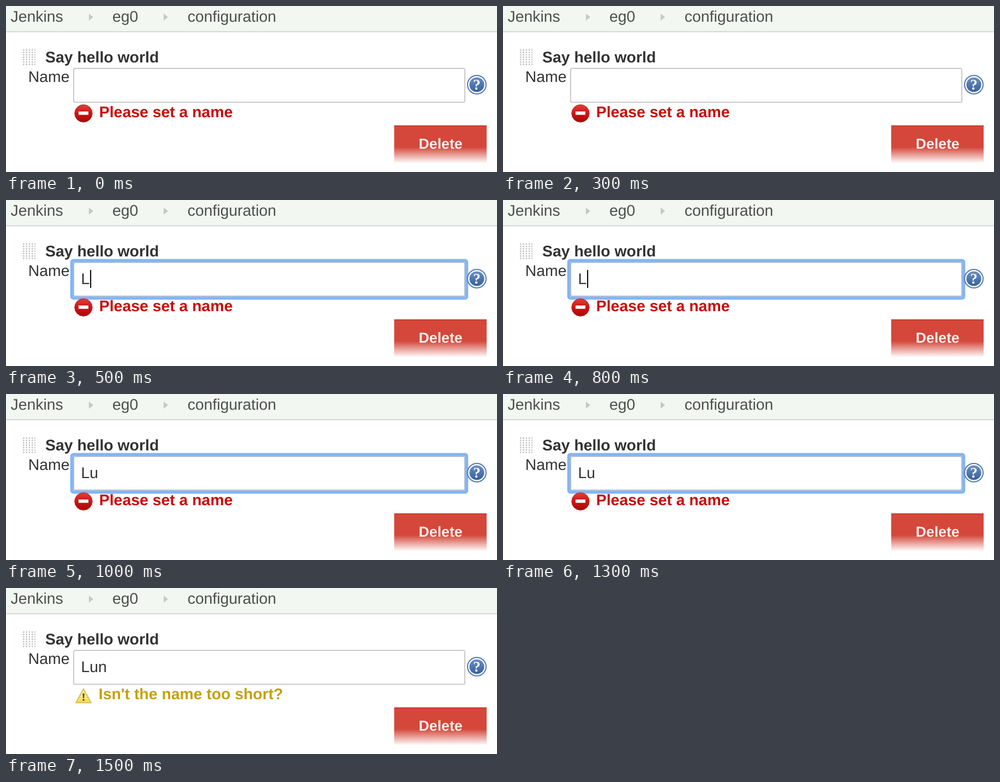
These frames come from a looping animation (900 by 306 pixels, 2000 ms). An HTML page:

```html
<!DOCTYPE html>
<html lang="en">
<head>
<meta charset="utf-8">
<title>Name field check</title>
<style>
  html, body { margin: 0; width: 100%; height: 100%; overflow: hidden; background: #fff; }
  svg { display: block; width: 900px; height: 306px; }
  text { font: 28.4px "Liberation Sans", Arial, sans-serif; fill: #333; white-space: pre; text-rendering: geometricPrecision; }
  .crumb { fill: #4d4f4d; }
  .bold { font-weight: bold; }
  .focus, .caret, .error, .warning, .typed tspan { animation: 2s step-end infinite; }
  .focus { animation-name: middle; }
  .caret { animation-name: second; }
  .error { animation-name: first-three; }
  .warning { animation-name: last; }
  .typed tspan:nth-child(1) { animation-name: from-second; }
  .typed tspan:nth-child(2) { animation-name: from-third; }
  .typed tspan:nth-child(3) { animation-name: last-letter; }
  @keyframes middle { 0%, 75% { visibility: hidden } 25% { visibility: visible } }
  @keyframes second { 0%, 50% { visibility: hidden } 25% { visibility: visible } }
  @keyframes first-three { 0% { visibility: visible } 75%, 100% { visibility: hidden } }
  @keyframes last { 0% { visibility: hidden } 75%, 100% { visibility: visible } }
  @keyframes from-second { 0% { fill-opacity: 0 } 25%, 100% { fill-opacity: 1 } }
  @keyframes from-third { 0% { fill-opacity: 0 } 50%, 100% { fill-opacity: 1 } }
  @keyframes last-letter { 0% { fill-opacity: 0 } 75%, 100% { fill-opacity: 1 } }
</style>
</head>
<body>
<svg viewBox="0 0 900 306">
  <defs>
    <pattern id="dots" x="31" y="80" width="5.3" height="4.4" patternUnits="userSpaceOnUse">
      <rect width="2.6" height="2.4" fill="#bdbfbd"/>
    </pattern>
    <linearGradient id="red" x2="0" y2="1">
      <stop offset="0" stop-color="#e0403a"/>
      <stop offset=".5" stop-color="#cf1412"/>
      <stop offset="1" stop-color="#a80808"/>
    </linearGradient>
    <linearGradient id="blue" x2="0" y2="1">
      <stop offset="0" stop-color="#6c8fc3"/>
      <stop offset="1" stop-color="#35609f"/>
    </linearGradient>
    <linearGradient id="yellow" x2="0" y2="1">
      <stop offset="0" stop-color="#fdf6b8"/>
      <stop offset="1" stop-color="#f5d94e"/>
    </linearGradient>
    <linearGradient id="fade" x2="0" y2="1">
      <stop offset="0" stop-color="#fff" stop-opacity="0"/>
      <stop offset="1" stop-color="#fff"/>
    </linearGradient>
  </defs>

  <rect width="900" height="47" fill="#f2f7f2"/>
  <rect y="46.5" width="900" height="1.8" fill="#d0d3d0"/>
  <g class="crumbs">
    <text class="crumb" x="8.5" y="29.3">Jenkins</text>
    <text class="crumb" x="195" y="29.3">eg0</text>
    <text class="crumb" x="332.8" y="29.3">configuration</text>
    <path d="M152 14l8 6.5-8 6.5zM289 14l8 6.5-8 6.5z" fill="#c6c8c6"/>
  </g>

  <rect x="31" y="80" width="23" height="31" fill="url(#dots)"/>
  <text class="bold" x="72" y="103.7">Say hello world</text>
  <text x="40.8" y="139.8">Name</text>

  <rect x="124" y="115" width="717" height="62.5" rx="3" fill="#fff" stroke="#c9c9c9" stroke-width="2"/>
  <g class="focus">
    <rect x="120.5" y="111.5" width="724" height="69.5" rx="3" fill="none" stroke="#83b5f6" stroke-width="5.5"/>
    <rect x="124" y="115" width="717" height="62.5" rx="1" fill="none" stroke="#a9bcd6" stroke-width="2"/>
  </g>
  <text class="typed" x="137.5" y="154.5"><tspan>L</tspan><tspan>u</tspan><tspan>n</tspan></text>
  <rect class="caret" x="154" y="129" width="2.2" height="33" fill="#111"/>

  <g class="help">
    <circle cx="863" cy="145" r="17" fill="#fff" stroke="#5478b0" stroke-width="2"/>
    <circle cx="863" cy="145" r="13.6" fill="url(#blue)"/>
    <text x="863" y="154" text-anchor="middle" style="font:bold 27px 'Liberation Serif',serif;fill:#fff">?</text>
  </g>

  <g class="error">
    <circle cx="142" cy="198" r="16.2" fill="url(#red)" stroke="#b8302c"/>
    <rect x="132.5" y="194" width="19" height="7" rx="1" fill="#fff" stroke="#9c1412" stroke-width=".8"/>
    <text class="bold" x="170.8" y="205" style="fill:#c90a08">Please set a name</text>
  </g>
  <g class="warning">
    <path d="M142 186L156 211.5H128z" fill="url(#yellow)" stroke="#dcc056" stroke-width="2" stroke-linejoin="round"/>
    <path d="M140.4 194.5h3.4l-.8 8.5h-1.8z" fill="#444"/>
    <circle cx="142.1" cy="206.3" r="1.7" fill="#444"/>
    <text class="bold" x="169.8" y="205" style="fill:#c4a010">Isn't the name too short?</text>
  </g>

  <rect x="711.5" y="220" width="169.5" height="69.5" fill="#d4473a"/>
  <path d="M712 220.7h169" stroke="#c8392d" stroke-width="1.5"/>
  <text class="bold" x="756.6" y="263" style="font-size:26.7px;fill:#fbf0ee">Delete</text>
  <rect x="711" y="260" width="171" height="30" fill="url(#fade)"/>
</svg>
</body>
</html>
```
